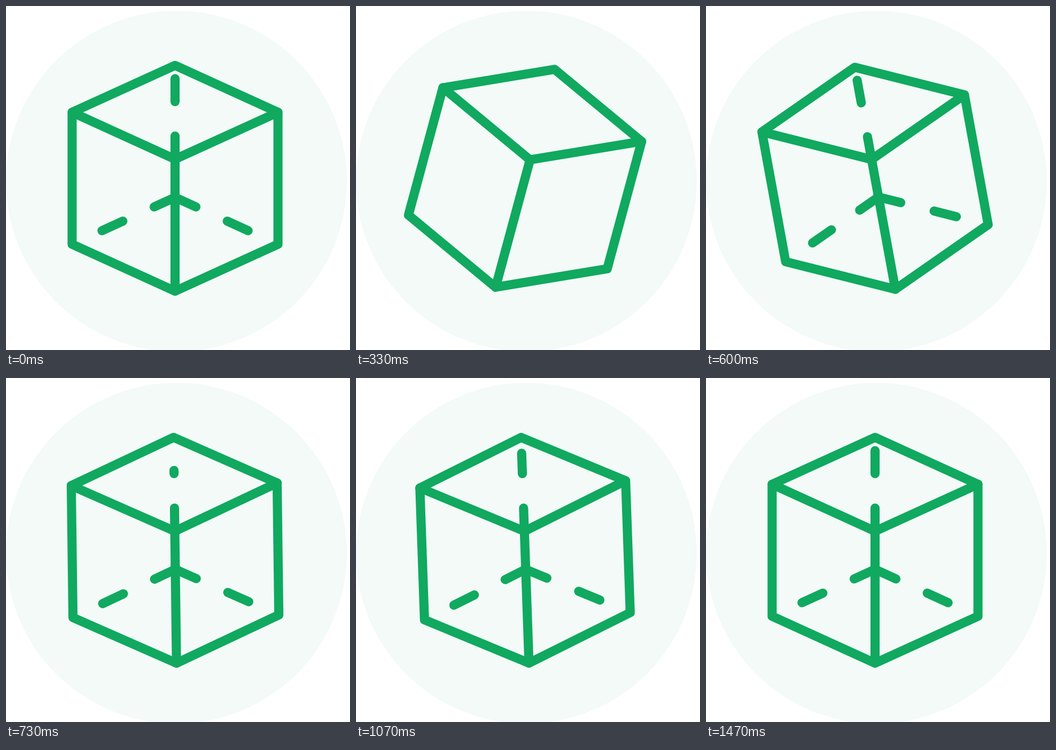
These frames come from a looping animation (640 by 640 pixels, 1670 ms). An HTML page with a canvas:

```html
<!DOCTYPE html>
<html lang="en">
<head>
<meta charset="utf-8">
<title>Swinging cube</title>
<style>
  html, body { margin: 0; width: 100%; height: 100%; overflow: hidden; background: #fff; }
  canvas { display: block; width: 100vw; height: 100vh; }
</style>
</head>
<body>
<canvas id="stage" width="640" height="640"></canvas>
<script>
const ctx = document.getElementById('stage').getContext('2d');
const LOOP = 1670, STEP = 100 / 3;
const GREEN = '#10a95f', DISC = '#f3faf8';
const DASH = [42.7, 64];

// Keys are [step, value]; the swing is in degrees, the reveal is a share of each hidden edge.
const SWING = [[0, 0], [9, 16.3], [17, -11], [25, 4], [32, -2], [44, 0]];
const REVEAL = [[3, 1], [10, 0], [18, 1], [26, 0.5], [34.8, 1]];

// Corners relative to the centre of the cube
const W = 191.5, H = 122.75;
const top_ = [0, -210], bottom = [0, 210], front = [0, -35.5], hub = [0, 35.5];
const upLeft = [-W, -H], upRight = [W, -H], lowLeft = [-W, H], lowRight = [W, H];

function valueAt(keys, step) {
  if (step <= keys[0][0]) return keys[0][1];
  for (let i = 1; i < keys.length; i++) {
    const [a, from] = keys[i - 1], [b, to] = keys[i];
    if (step <= b) {
      const u = (step - a) / (b - a);
      return from + (to - from) * u * u * (3 - 2 * u);
    }
  }
  return keys[keys.length - 1][1];
}

function line(points, closed) {
  ctx.beginPath();
  points.forEach(p => ctx.lineTo(...p));
  if (closed) ctx.closePath();
  ctx.stroke();
}

function hiddenEdge(end, share, offset) {
  ctx.setLineDash(DASH);
  ctx.lineDashOffset = offset;
  line([hub, hub.map((v, i) => v + (end[i] - v) * share)]);
  ctx.setLineDash([]);
}

function draw(step) {
  ctx.fillStyle = '#fff';
  ctx.fillRect(0, 0, 640, 640);
  ctx.fillStyle = DISC;
  ctx.beginPath();
  ctx.arc(317, 326, 317, 0, 2 * Math.PI);
  ctx.fill();

  ctx.save();
  ctx.translate(314.5, 320.5);
  ctx.rotate(valueAt(SWING, step) * Math.PI / 180);
  ctx.strokeStyle = GREEN;
  ctx.lineWidth = 17;
  ctx.lineCap = ctx.lineJoin = 'round';

  line([top_, upRight, lowRight, bottom, lowLeft, upLeft], true);
  line([upLeft, front, upRight]);
  line([front, bottom]);

  const share = valueAt(REVEAL, step);
  if (share > 0) {
    hiddenEdge(lowLeft, share, 0);
    hiddenEdge(lowRight, share, 0);
    hiddenEdge(top_, share, 35.3);
  }
  ctx.restore();
}

const start = performance.now();
function tick() {
  const t = (performance.now() - start) % LOOP;
  draw(Math.floor(t / STEP + 0.15));
  requestAnimationFrame(tick);
}
tick();
</script>
</body>
</html>
```
